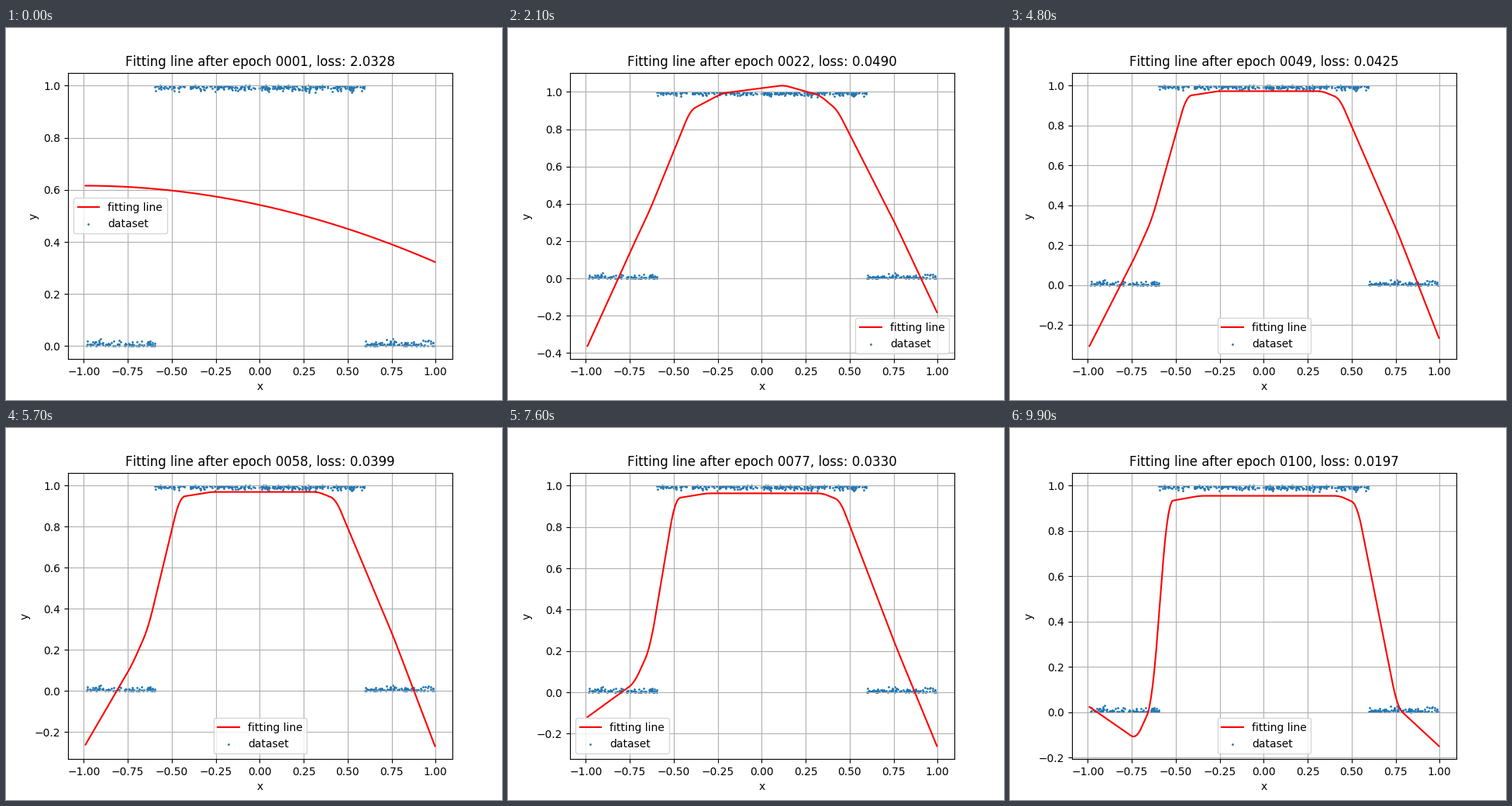
A matplotlib script that plays this animation: 640 by 480 pixels, repeating every 10 s.

```python
import numpy as np
import matplotlib.pyplot as plt
from matplotlib.animation import FuncAnimation

FRAMES, INTERVAL = 100, 100
X_MIN, X_MAX = -0.9906, 0.9963
WARMUP = 12  # epochs until the arch shape is found

plt.rcParams['text.kerning_factor'] = 6


def make_dataset(count=480):
    rng = np.random.default_rng(7)
    x = rng.uniform(X_MIN, X_MAX, count)
    noise = np.clip(np.abs(rng.normal(0, .01, count)), 0, .031)
    return x, np.where(np.abs(x) < .597, 1 - noise, noise)


def ramp(epoch, start, end):
    return np.clip((epoch - start) / (end - start), 0, 1)


def first_guess(x):
    return .542 - .147 * x - .073 * x ** 2


def arch(x, epoch):
    """Rounded polyline whose corners drift as training goes on."""
    u = ramp(epoch, WARMUP, FRAMES)
    hump = 1 - ramp(epoch, WARMUP, 34)
    sink, late = u ** 2.5, u ** 6
    top = .985 - .03 * u
    left = -.40 - .145 * u ** 1.5
    right = .43 + .1 * late
    corners = [
        (X_MIN, -.365 + .388 * min(1, 1.35 * sink)),
        (-.725, .19 - .31 * sink),
        (-.635, .37 - .335 * sink),
        (left, top - .025 - .1 * hump),
        (left + .18, top + .02 * hump),
        (.125, top + .1 * hump),
        (right - .1, top),
        (right, top - .035 - .08 * hump),
        (.76, .27 + .04 * hump - .25 * late),
        (X_MAX, -.24 - .06 * u + .12 * hump + .15 * late),
    ]
    kx, ky = zip(*corners)
    reach = np.minimum(.025, np.minimum(x - X_MIN, X_MAX - x))
    return np.mean([np.interp(x + k * reach, kx, ky)
                    for k in np.linspace(-1, 1, 7)], axis=0)


def curve(epoch):
    learned = 1 - (1 - ramp(epoch, 1, WARMUP)) ** 2
    return (1 - learned) * first_guess(line_x) + learned * arch(line_x, epoch)


def loss_at(epoch):
    u = ramp(epoch, WARMUP, FRAMES)
    start = 1.9815 * (1 - ramp(epoch, 1, WARMUP)) ** 24
    return .0513 + start - .0202 * u - .0114 * u ** 4


line_x = np.linspace(X_MIN, X_MAX, 200)
data_x, data_y = make_dataset()
fig, ax = plt.subplots(figsize=(6.4, 4.8), dpi=100)


def draw(frame):
    epoch = frame + 1
    ax.clear()
    ax.plot(line_x, curve(epoch), color='red', label='fitting line')
    ax.scatter(data_x, data_y, s=1, label='dataset')
    ax.set_title(f'Fitting line after epoch {epoch:04d}, loss: {loss_at(epoch):.4f}')
    ax.set_xlabel('x')
    ax.set_ylabel('y')
    ax.grid(True)
    ax.legend(loc='best')


anim = FuncAnimation(fig, draw, frames=FRAMES, init_func=lambda: draw(0),
                     interval=INTERVAL, repeat=True, repeat_delay=0)
plt.show()
```
